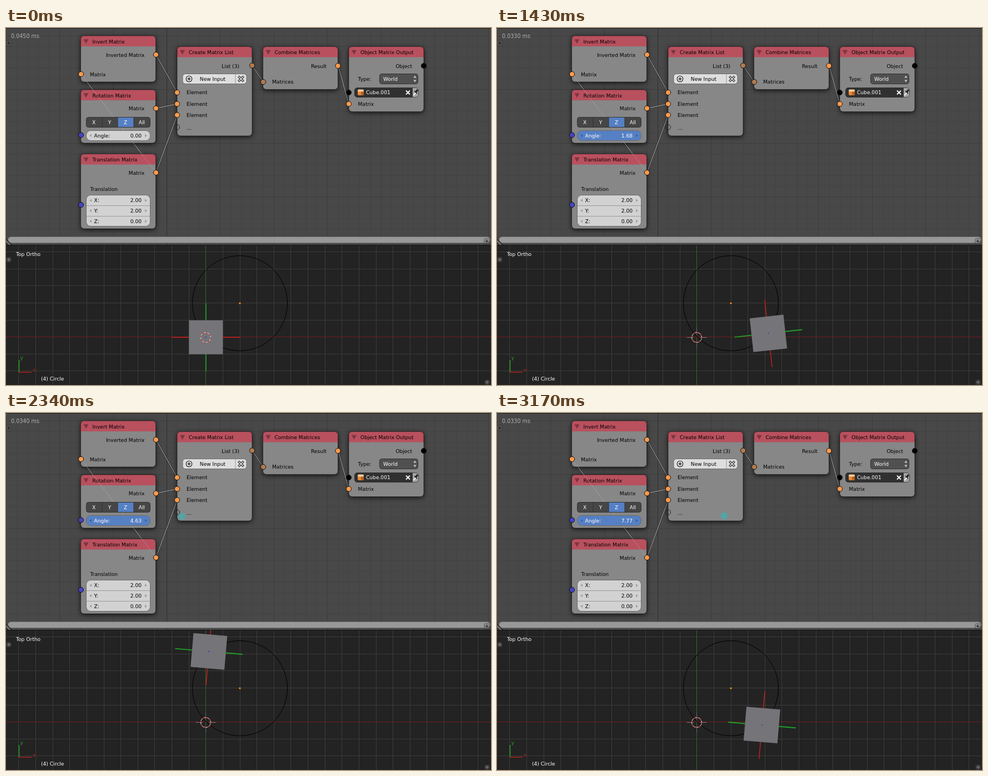
These frames come from a looping animation (873x642 px, 3.22 s). An HTML page with a canvas:

```html
<!DOCTYPE html>
<html>
<head>
<meta charset="utf-8">
<style>
  html, body { margin: 0; width: 100%; height: 100%; overflow: hidden; background: #232323; }
  canvas { display: block; }
</style>
</head>
<body>
<canvas id="stage" width="873" height="642"></canvas>
<script>
const ctx = document.getElementById('stage').getContext('2d');
const LOOP = 3220, PRESS = 390, TAU = Math.PI * 2;
const ORANGE = '#ff9a4c', BROWN = '#b27b50', BLUE = '#4444c4', BLACK = '#000', EDGE = '#6c6c6c';

// time, angle, execution time in 1/1000 ms
const keys = [
  [0, 0, 45], [710, 0.02, 34], [850, 0.11, 33], [1000, 0.39, 34], [1210, 0.93, 34],
  [1430, 1.68, 33], [1760, 2.66, 34], [1850, 2.85, 35], [2140, 4.2, 34],
  [2300, 4.4, 33], [2540, 5.76, 34], [3170, 7.77, 33]
];

// The drag is sampled about every 42 ms, so the pose moves in steps.
function poseAt(t) {
  const k = keys.findLastIndex(key => t >= key[0]);
  const [start, angle, cost] = keys[k], next = keys[k + 1];
  if (!k || !next) return { angle, cost };
  const gap = next[0] - start, steps = Math.round(gap / 42);
  const i = Math.min(steps - 1, Math.floor((t - start + 4) * steps / gap));
  return { angle: angle + (next[1] - angle) * i / steps, cost: cost + i % 2 };
}

function text(str, x, y, color = BLACK, align = 'left', size = 9.1) {
  ctx.font = `${size}px "DejaVu Sans", sans-serif`;
  ctx.textAlign = align;
  ctx.fillStyle = color;
  ctx.fillText(str, x, Math.round(y + 3.2));
}

function line(x1, y1, x2, y2, color, width = 1) {
  ctx.strokeStyle = color;
  ctx.lineWidth = width;
  ctx.beginPath();
  ctx.moveTo(x1, y1);
  ctx.lineTo(x2, y2);
  ctx.stroke();
}

function disc(x, y, r, fill, stroke, width = 1) {
  ctx.beginPath();
  ctx.arc(x, y, r, 0, TAU);
  if (fill) { ctx.fillStyle = fill; ctx.fill(); }
  if (stroke) { ctx.strokeStyle = stroke; ctx.lineWidth = width; ctx.stroke(); }
}

function box(x, y, w, h, r, fill, stroke) {
  ctx.beginPath();
  ctx.roundRect(x, y, w, h, r);
  ctx.fillStyle = fill;
  ctx.fill();
  if (stroke) { ctx.strokeStyle = stroke; ctx.lineWidth = 1; ctx.stroke(); }
}

function triangle(x, y, w, h, color) {
  ctx.fillStyle = color;
  ctx.beginPath();
  ctx.moveTo(x - w, y - h);
  ctx.lineTo(x + w, y - h);
  ctx.lineTo(x, y + h);
  ctx.fill();
}

function sideArrow(x, y, dir, color) {
  ctx.fillStyle = color;
  ctx.beginPath();
  ctx.moveTo(x + 2 * dir, y);
  ctx.lineTo(x - 2 * dir, y - 2.8);
  ctx.lineTo(x - 2 * dir, y + 2.8);
  ctx.fill();
}

function cross(x, y, r, color, width) {
  line(x - r, y - r, x + r, y + r, color, width);
  line(x - r, y + r, x + r, y - r, color, width);
}

function plusTab(x, y, color) {
  box(x - 5, y - 5, 10, 10, 3, 'rgba(110,110,110,.3)', 'rgba(20,20,20,.4)');
  line(x - 3, y, x + 3, y, color, 1.3);
  line(x, y - 3, x, y + 3, color, 1.3);
}

function node(title, x, y, h) {
  ctx.save();
  ctx.shadowColor = 'rgba(0,0,0,.75)';
  ctx.shadowBlur = 8;
  ctx.shadowOffsetY = 2;
  box(x, y, 135, h, 6, '#878787');
  ctx.restore();
  box(x, y, 135, 19, [6, 6, 0, 0], '#b9505e');
  ctx.beginPath();
  ctx.roundRect(x, y, 135, h, 6);
  ctx.strokeStyle = 'rgba(0,0,0,.5)';
  ctx.lineWidth = 1;
  ctx.stroke();
  triangle(x + 9.5, y + 10.3, 4.5, 4, '#7c3540');
  text(title, x + 21, y + 10.3);
}

const socket = (x, y, color) => disc(x, y, 4.6, color, '#111');

function link(x1, y1, x2, y2) {
  line(x1, y1, x2, y2, 'rgba(20,20,20,.45)', 2.6);
  line(x1, y1, x2, y2, '#b8b8b8', 1);
}

function number(label, value, y, active) {
  const color = active ? '#fff' : BLACK, arrow = active ? '#3c64a0' : '#a0a0a0';
  sideArrow(152, y, -1, arrow);
  sideArrow(252, y, 1, arrow);
  text(label, 158.5, y, color);
  text(value.toFixed(2), 244, y, color, 'right');
}

function editorBackground() {
  ctx.fillStyle = '#484848';
  ctx.fillRect(0, 0, 873, 390);
  const step = 19.29;
  for (let i = -15; i <= 31; i++) {
    const color = i % 5 ? '#434343' : '#3d3d3d';
    const x = Math.round(289 + i * step) + .5, y = Math.round(14 + i * step) + .5;
    line(x, 0, x, 390, i ? color : '#2f2f2f');
    line(0, y, 873, y, color);
  }
  line(0, .5, 873, .5, '#1c1c1c');
}

function editor(angle, cost, active) {
  editorBackground();
  text(`0.0${cost}0 ms`, 9, 15, '#b0b0b0', 'left', 9.6);
  plusTab(5, 27, '#222');

  link(270, 48, 308, 116);
  link(270, 144.5, 308, 136.5);
  link(270, 260, 308, 157);
  link(443, 67.5, 463, 97);
  link(598, 68, 617, 137);
  link(270, 260, 135, 83);

  node('Invert Matrix', 134.5, 14, 83);
  node('Rotation Matrix', 134.5, 111, 96);
  node('Translation Matrix', 134.5, 226.5, 134.5);
  node('Create Matrix List', 308, 33.5, 160.5);
  node('Combine Matrices', 462.5, 33.5, 77);
  node('Object Matrix Output', 617, 33.5, 117);
  line(135, 83, 270, 260, 'rgba(205,205,205,.3)');

  text('Inverted Matrix', 249.5, 48.5, BLACK, 'right');
  text('Matrix', 151, 84);
  text('Matrix', 249.5, 145, BLACK, 'right');
  text('Matrix', 249.5, 261, BLACK, 'right');
  text('Translation', 151.5, 290);
  text('List (3)', 420, 68.5, BLACK, 'right');
  [116, 136.5, 156.5].forEach(y => text('Element', 325, y));
  text('...', 325, 179.5);
  text('Result', 577, 68.5, BLACK, 'right');
  text('Matrices', 479, 97);
  text('Object', 731, 68.5, BLACK, 'right');
  text('Type:', 633.5, 92);
  text('Matrix', 633.5, 137);

  // Axis selector
  box(144.5, 160.5, 115, 18, 4, '#464646', '#333');
  ctx.fillStyle = '#5680c4';
  ctx.fillRect(201, 161, 29, 17);
  [173, 201, 230].forEach(x => line(x, 161, x, 178, '#333'));
  ['X', 'Y', 'Z', 'All'].forEach((s, i) =>
    text(s, [158, 186.5, 215, 244.5][i], 169.5, '#fff', 'center'));

  // Pointer dot, which passes beneath the angle field
  if (active) {
    const x = 180.5 + 29.4 * angle;
    const y = x < 351 ? 190 - (x - 264) * .08 : 183 + (x - 351) * .035;
    disc(x, y, 6.3, x > 270 && x < 308 ? '#4343d2' : '#52a5a6');
  }
  box(144.5, 184.5, 115, 18, 8, active ? '#5680c4' : '#d2d2d2', EDGE);
  number('Angle:', angle, 193.5, active);

  box(144.5, 300.5, 115, 56, 8, '#d2d2d2', EDGE);
  [319.5, 338.5].forEach(y => line(145, y, 259, y, '#9a9a9a'));
  number('X:', 2, 310);
  number('Y:', 2, 328.5);
  number('Z:', 0, 347.5);

  // New input button
  box(318, 82.5, 115, 18, 5, '#dedede', EDGE);
  line(413, 83, 413, 100, '#999');
  text('New Input', 372, 92, BLACK, 'center');
  disc(329.5, 91.5, 5.3, null, '#222', 1.1);
  line(326.5, 91.5, 332.5, 91.5, '#222', 1.4);
  line(329.5, 88.5, 329.5, 94.5, '#222', 1.4);
  cross(423, 91.5, 4.6, '#222', 3.8);
  cross(423, 91.5, 4.2, '#e8e8e8', 1.6);

  // Output type and object picker
  box(672.5, 82.5, 69, 18, 4, '#505050', '#333');
  text('World', 679, 92, '#fff');
  triangle(736, 95.5, 2.6, 2, '#ccc');
  triangle(736, 87.5, 2.6, -2, '#ccc');
  box(627.5, 107.5, 115, 17, 5, '#a5a5a5', '#444');
  box(627.5, 107.5, 104, 17, [5, 0, 0, 5], '#303030', '#333');
  box(633, 112, 11, 9, 2, '#e58a3a');
  box(633, 110.5, 11, 4, 2, '#f8cfa0');
  ctx.fillStyle = '#b8611f';
  ctx.fillRect(639, 114.5, 5, 6);
  text('Cube.001', 648, 116, '#fff');
  cross(723.5, 116, 3.5, '#fff', 1.8);
  line(733.5, 121, 738, 116, '#eee', 2);
  line(737, 116, 741, 111, '#222', 3.2);
  line(735, 113, 740, 118, '#222', 1.4);

  [[135, 83], [270, 48], [270, 144.5], [270, 260], [308, 116], [308, 136.5], [308, 156.5],
   [597.5, 68], [617, 136.5]].forEach(p => socket(...p, ORANGE));
  socket(443, 67.5, BROWN);
  socket(463, 97, BROWN);
  socket(135, 192.5, BLUE);
  socket(135, 318, BLUE);
  socket(752, 68, BLACK);
  socket(617, 116, BLACK);
  disc(308, 178.5, 4.6, null, '#222');

  // Scroll bar and region edge
  box(3.5, 375.5, 868, 11, 5.5, '#989898', EDGE);
  plusTab(865.5, 383.5, '#333');
  for (let i = 0; i < 3; i++) line(0, 379 + i * 4, 11 - i * 4, 390, i % 2 ? '#aaa' : '#111');
}

function cube(angle) {
  ctx.save();
  ctx.translate(421, 495);
  ctx.rotate(-angle);
  ctx.translate(-61.2, 61.2);
  line(-61, 0, 61, 0, '#c41e1e', 1.5);
  line(0, -61, 0, 61, '#1f9e26', 1.8);
  ctx.fillStyle = '#757478';
  ctx.fillRect(-30.5, -30.5, 61, 61);
  disc(0, 0, 1.2, '#4343b4');
  ctx.restore();
}

function cursor3d(x, y) {
  [[1, 0], [-1, 0], [0, 1], [0, -1]].forEach(([dx, dy]) =>
    line(x + dx * 6, y + dy * 6, x + dx * 18, y + dy * 18, dx ? '#5e8080' : '#6a6a6a'));
  disc(x, y, 9, null, '#e8e8e8');
  ctx.setLineDash([TAU * 9 / 16]);
  disc(x, y, 9, null, '#d82424', 1.2);
  ctx.setLineDash([]);
}

function viewport(angle) {
  ctx.save();
  ctx.beginPath();
  ctx.rect(0, 390, 873, 252);
  ctx.clip();
  ctx.fillStyle = '#232323';
  ctx.fillRect(0, 390, 873, 252);
  const grid = (i, xColor, yColor) => {
    const x = Math.floor(359.8 + i * 30.62) + .5, y = Math.floor(555.7 + i * 30.62) + .5;
    line(x, 390, x, 642, xColor);
    line(0, y, 873, y, yColor);
  };
  for (let i = -11; i <= 17; i++) grid(i, '#3b3b3b', '#3b3b3b');
  grid(0, '#2c6a2e', '#701c1f');
  line(0, 390.5, 873, 390.5, '#111');
  disc(421, 495, 85.5, null, BLACK);
  disc(421, 495, 2.1, '#e8942c', '#3a2508', .8);
  cube(angle);
  cursor3d(359.5, 556.5);

  text('Top Ortho', 18, 406.5, '#fff');
  text('(4) Circle', 63, 630.5, '#fff');
  line(23.5, 619, 23.5, 597, '#27a327', 1.5);
  line(23, 619, 46, 619, '#b01f1f', 1.5);
  text('y', 25.5, 592.5, '#27a327');
  text('x', 48, 614.5, '#b01f1f');
  plusTab(5, 416.5, '#777');
  plusTab(866, 637, '#777');
  ctx.restore();
}

function draw() {
  const t = performance.now() % LOOP;
  const { angle, cost } = poseAt(t);
  editor(angle, cost, t >= PRESS);
  viewport(angle);
  requestAnimationFrame(draw);
}
draw();
</script>
</body>
</html>
```
